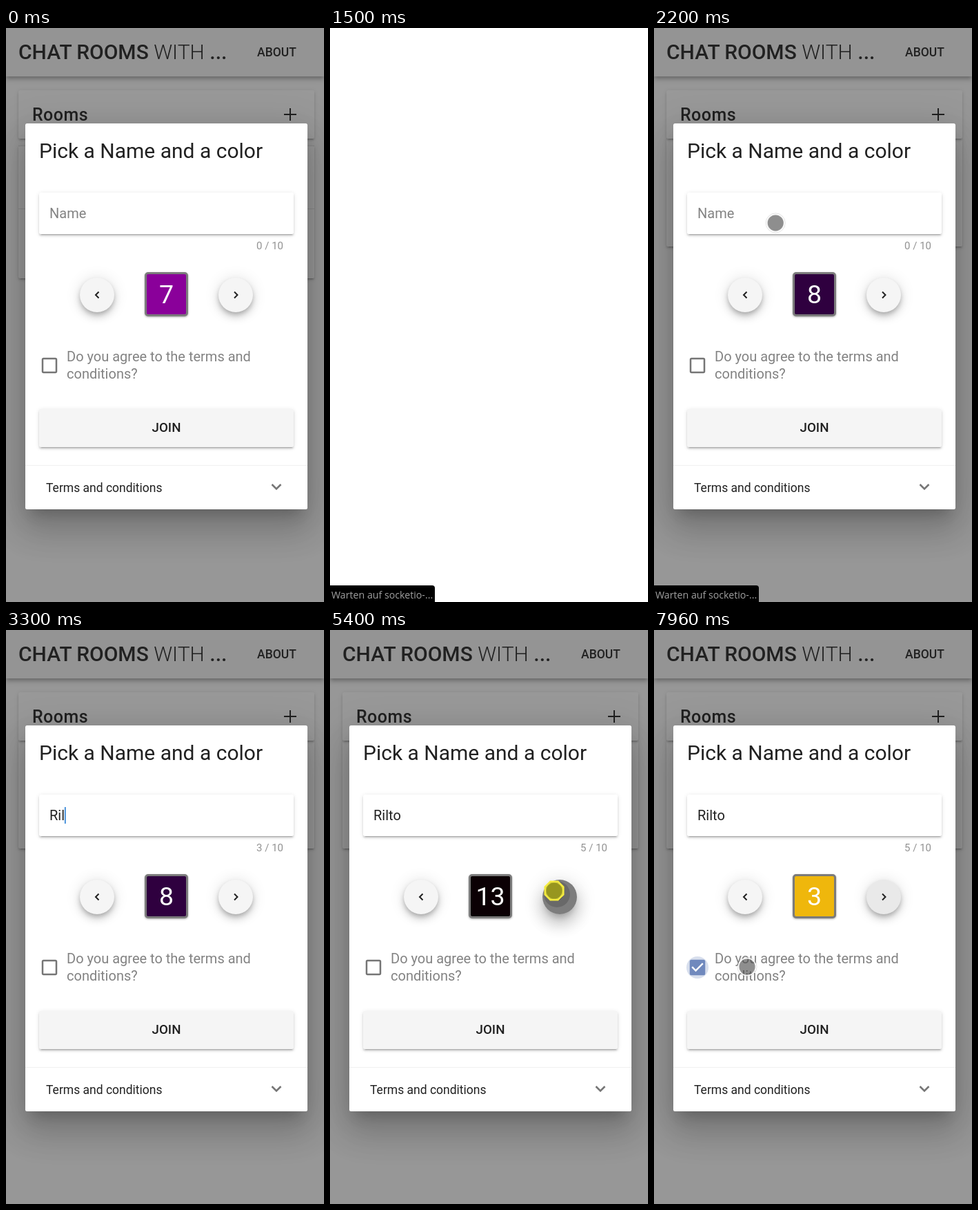
Recreate the animation shown at these times as an HTML page. Size 461 by 830 pixels, loop 8 s.

```html
<!DOCTYPE html>
<html lang="en">
<head>
<meta charset="utf-8">
<title>Chat rooms</title>
<style>
  html, body { margin: 0; width: 100%; height: 100%; overflow: hidden; background: #fff; }
  #stage { position: relative; width: 461px; height: 830px; overflow: hidden; }
  #stage div, svg { position: absolute; }
  svg { left: 0; top: 0; width: 461px; height: 830px; overflow: visible;
        font-family: Roboto, sans-serif; fill: #212121; }
  .fill { left: 0; top: 0; width: 461px; height: 830px; }
  .raised { border-radius: 2.5px; background: #fff;
    box-shadow: 0 3.75px 1.25px -2.5px #0003, 0 2.5px 2.5px #00000024, 0 1.25px 6.25px #0000001f; }
  .bar { background: #f5f5f5;
    box-shadow: 0 2.5px 5px -1px #0003, 0 5px 6px #00000024, 0 1px 12px #0000001f; }
  .round { top: 361px; width: 50px; height: 50px; border-radius: 50%; background: #f5f5f5; overflow: hidden;
    box-shadow: 0 3.75px 6px -1px #0003, 0 7px 12px #00000024, 0 1px 22px #0000001f; }
  .round.pressed { box-shadow: 0 8px 10px -4px #0003, 0 15px 21px 2px #00000024, 0 6px 27px 5px #0000001f; }
  .sheet { left: 28px; top: 138px; width: 409px; height: 558px; border-radius: 2.5px; background: #fff;
    box-shadow: 0 14px 19px -9px #0003, 0 30px 47px 4px #00000024, 0 11px 57px 10px #0000001f; }
  #swatch { left: 201px; top: 353px; width: 57px; height: 58px; border: 3px solid #7b7b7b; border-radius: 5px;
    box-shadow: 0 1px 3px #0005; }
  #dialog { transform-origin: 232px 415px; }
  .medium { font-weight: 500; }
  .muted { fill: #838383; }
  .line { fill: none; stroke: #212121; stroke-width: 2; }
</style>
</head>
<body>
<div id="stage">
  <div id="page" class="fill" style="background:#fafafa">
    <div id="rooms" class="raised" style="left:18px;width:429px"></div>
    <div class="raised" style="left:18px;top:90px;width:429px;height:70px"></div>
    <div class="bar" style="left:0;top:0;width:461px;height:70px"></div>
    <svg>
      <text x="18" y="45" font-size="30" class="medium">CHAT ROOMS <tspan font-weight="300">WITH</tspan> ...</text>
      <text x="364" y="41" font-size="17.5" class="medium">ABOUT</text>
      <text x="38" y="134" font-size="25" class="medium" letter-spacing=".5">Rooms</text>
      <path class="line" d="M403 125H421M412 116V134"/>
      <path id="divider" d="M18 170.5H447M18 261.5H447" stroke="#0000001f"/>
    </svg>
    <div id="shade" class="fill" style="background:#212121"></div>
  </div>

  <div id="dialog" class="fill">
    <div class="sheet"></div>
    <div class="raised" style="left:48px;top:238px;width:369px;height:60px"></div>
    <div class="round" style="left:107px"></div>
    <div class="round" id="next" style="left:308px">
      <div id="tint" style="width:50px;height:50px;background:#000"></div>
      <div id="ripple" style="border-radius:50%;background:#00000029"></div>
    </div>
    <div id="swatch"></div>
    <div class="raised" style="left:48px;top:551px;width:369px;height:55px;background:#f5f5f5"></div>
    <svg>
      <text x="48" y="188" font-size="30">Pick a Name and a color</text>
      <text id="name" x="63" y="275" font-size="20"></text>
      <rect id="caret" y="256" width="1.5" height="24" fill="#1976d2"/>
      <text id="counter" x="402" y="320" font-size="15" text-anchor="end" fill="#929292"></text>
      <path class="line" d="M134.5 381.5L130 386L134.5 390.5M331 381.5L335.500 386L331 390.5"/>
      <text id="number" x="232.500" y="398" font-size="37.5" text-anchor="middle" style="fill:#fff"></text>
      <rect id="box" x="53" y="478" width="20" height="20" rx="1.5" fill="none" stroke="#757575" stroke-width="2.5"/>
      <g id="checked">
        <circle cx="63" cy="488" r="16" fill="#6f88bd" opacity=".27"/>
        <rect x="51.75" y="476.75" width="22.5" height="22.5" rx="2.5" fill="#7089bd"/>
        <path class="line" d="M55.200 487.200L60.500 492.500L70.800 482.200" style="stroke:#fff;stroke-width:2.4"/>
      </g>
      <g class="muted" font-size="20">
        <text x="88" y="482">Do you agree to the terms and</text>
        <text x="88" y="507">conditions?</text>
      </g>
      <text x="232.500" y="584" font-size="18.75" text-anchor="middle" class="medium">JOIN</text>
      <path d="M28 632.5H437" stroke="#f1f1f1"/>
      <text x="58" y="671" font-size="17.5">Terms and conditions</text>
      <path class="line" d="M385.500 660L392 666.500L398.500 660" style="stroke:#757575;stroke-width:2.5"/>
    </svg>
  </div>

  <svg>
    <g id="status">
      <path d="M0 806H148Q152 806 152 810V830H0Z" fill="#000"/>
      <text x="2" y="825" font-size="14.2" font-family="Open Sans, sans-serif" fill="#a0a0a0">Warten auf socketio-...</text>
    </g>
    <g id="pointer">
      <g id="idle">
        <circle r="14" fill="none" stroke="#0002"/>
        <circle r="12.500" fill="#484848" fill-opacity=".62" stroke="#fff" stroke-opacity=".85" stroke-width="2"/>
      </g>
      <g id="active">
        <path d="M-5.500 -13.300H5.500L13.300 -5.500V5.500L5.500 13.300H-5.500L-13.300 5.500V-5.500Z"
              fill="#c9c43a" stroke="#f4ec40" stroke-width="2.500"/>
        <circle r="11.500" fill="#97961f"/>
      </g>
    </g>
  </svg>
</div>

<script>
const LOOP = 8000;
const NAME = 'Rilto';
const KEY_TIMES = [3070, 3180, 3300, 3380, 3530];
const COLORS = { 1: '#7a1f2b', 2: '#c83c3c', 3: '#efb70c', 7: '#8a009a', 8: '#2f003f', 9: '#1b1464',
  10: '#123456', 11: '#0d3b36', 12: '#2a1a18', 13: '#0b0004', 14: '#333', 15: '#666' };
// Each click on the arrow: time, number it brings up
const CLICKS = [[4760, 9], [4910, 10], [5060, 11], [5210, 12], [5360, 13],
  [5710, 14], [5860, 15], [6010, 1], [6160, 2], [7000, 3]];
const POINTER = [[70, 92, 470], [110, 92, 470], [1690, 202, 242], [1810, 236, 268], [1890, 252, 302],
  [1970, 240, 298], [2120, 200, 285], [2280, 153, 279], [3920, 153, 279], [4080, 160, 335],
  [4400, 245, 385], [4680, 325, 377], [6270, 325, 377], [6500, 240, 552], [6570, 243, 500],
  [6630, 244, 431], [6840, 325, 383], [7340, 325, 383], [7490, 225, 490], [7570, 75, 541],
  [7650, 63, 488], [7890, 63, 488], [7960, 135, 487]];
const TINT = [[4680, 0], [4760, .12], [5400, .49], [5710, .42], [6200, .48], [6450, .1],
  [6900, .1], [7000, .25], [7200, .2], [7400, .05]];

const $ = Object.fromEntries([...document.querySelectorAll('[id]')].map(el => [el.id, el]));
const between = (t, a, b) => t >= a && t < b;
const progress = (t, a, b) => Math.min(1, Math.max(0, (t - a) / (b - a)));
const show = (el, on) => { el.style.visibility = on ? 'visible' : 'hidden'; };

function sample(keys, t) {
  const i = keys.findIndex(k => k[0] > t);
  if (i < 0) return keys.at(-1).slice(1);
  if (i === 0) return keys[0].slice(1);
  const [a, b] = [keys[i - 1], keys[i]];
  const f = progress(t, a[0], b[0]);
  return a.slice(1).map((v, n) => v + (b[n + 1] - v) * f);
}

function drawPage(t) {
  const reloaded = t >= 1500;
  show($.page, !between(t, 1500, 1650));
  show($.divider, !reloaded);
  $.rooms.style.top = reloaded ? '160px' : '170px';
  $.rooms.style.height = reloaded ? '156px' : '192px';
  $.shade.style.opacity = .46 * (reloaded ? progress(t, 1775, 1975) : 1);
  const open = reloaded ? 1 - (1 - progress(t, 1730, 1880)) ** 3 : 1;
  $.dialog.style.opacity = open;
  $.dialog.style.transform = open < 1 ? `scale(${.5 + open / 2})` : 'none';
  show($.status, between(t, 1270, 2240));
}

function drawForm(t) {
  const typed = KEY_TIMES.filter(k => t >= k).length;
  $.name.textContent = typed ? NAME.slice(0, typed) : 'Name';
  $.name.setAttribute('class', typed ? '' : 'muted');
  $.counter.textContent = `${typed} / 10`;
  show($.caret, between(t, 2370, 2840) || between(t, 3070, 4000));
  $.caret.setAttribute('x', 63 + (typed ? $.name.getComputedTextLength() : 0));

  const last = CLICKS.findLast(c => t >= c[0]);
  const number = last ? last[1] : t < 1500 ? 7 : 8;
  $.number.textContent = number;
  $.swatch.style.background = COLORS[number];

  const agreed = t >= 7740;
  show($.checked, agreed);
  show($.box, !agreed);
}

function drawPointer(t) {
  const [x, y] = sample(POINTER, t);
  const press = CLICKS.find(c => between(t, c[0] - 80, c[0] + 60));
  const active = press || between(t, 2370, 2520) || between(t, 7740, 7890);
  const visible = between(t, 70, 110) || between(t, 1690, 2840) || t >= 3920;
  $.pointer.setAttribute('transform', `translate(${x} ${y})`);
  show($.idle, visible && !active);
  show($.active, visible && active);

  const tint = sample(TINT, t)[0];
  $.tint.style.opacity = tint;
  $.next.classList.toggle('pressed', tint > .2);
  const r = press ? Math.min(25, (t - press[0] + 80) * .16) : 0;
  $.ripple.style.cssText += `;left:${21 - r}px;top:${21 - r}px;width:${2 * r}px;height:${2 * r}px`;
}

function frame(now) {
  const t = now % LOOP;
  drawPage(t);
  drawForm(t);
  drawPointer(t);
  requestAnimationFrame(frame);
}
const start = performance.now();
requestAnimationFrame(function first() {
  const tick = () => { drawAt(performance.now() - start); requestAnimationFrame(tick); };
  tick();
});
function drawAt(ms) {
  const t = ms % LOOP;
  drawPage(t);
  drawForm(t);
  drawPointer(t);
}
</script>
</body>
</html>
```
